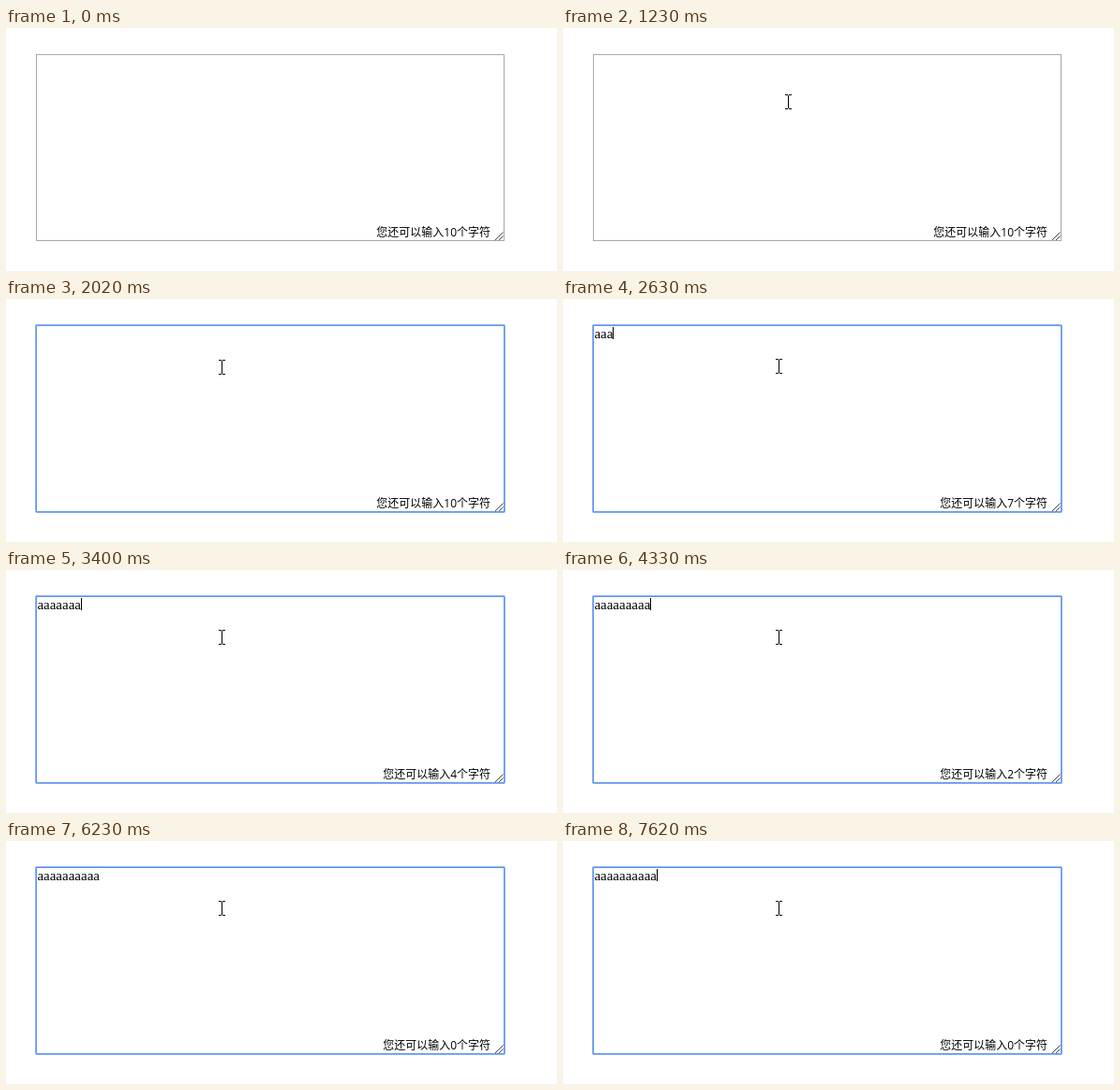
An HTML page for the animation above (8 s loop, 588 by 260 pixels).

```html
<!DOCTYPE html>
<html lang="zh-CN">
<head>
<meta charset="utf-8">
<style>
  html, body { margin: 0; width: 588px; height: 260px; overflow: hidden; background: #fff; }
  svg { display: block; }
  path, rect { fill: none; }
  #typed { font: 15px "Liberation Serif", serif; }
  #hint { font: 12px "Open Sans", "Noto Sans CJK SC", "Noto Sans CJK", sans-serif; text-anchor: end; }
</style>
</head>
<body>
<svg width="588" height="260" viewBox="0 0 588 260">
  <rect x="32.5" y="28.5" width="499" height="199" stroke="#a9a9a9"/>
  <path d="M522 227l8.5-8.5M526 227l4.5-4.5" stroke="#444"/>
  <rect id="ring" x="32" y="28" width="500" height="200" rx="1" stroke="#4d90fe" stroke-opacity=".7" stroke-width="2"/>
  <text id="typed" x="33.4" y="42"></text>
  <path id="caret" d="M.5 30v13" stroke="#000"/>
  <text id="hint" x="517" y="223"></text>
  <path id="beam" d="M-3-7.5h3m1 0h3M.5-7v14M-3 7.5h3m1 0h3" stroke="#000"/>
  <path id="arrow" d="M.5.5v15.5l3.6-3.4 2.6 6 2.4-1-2.6-5.8h5z" stroke="#000" style="fill:#fff"/>
</svg>
<script>
const LOOP = 8000, START = 430, STEP = 156; // ms
const LIMIT = 10, FOCUS = 6, BLINK = 3;     // the last two in steps
const [ring, typed, caret, hint, beam, arrow] =
  ['ring', 'typed', 'caret', 'hint', 'beam', 'arrow'].map(id => document.getElementById(id));

// Quick typing that slows to one letter every three steps
const keys = Array.from({ length: LIMIT }, (_, i) => Math.floor(Math.max(11 + 1.4 * i, 3 * i + 1)));
// Letters over the limit, each trimmed one step later
const surplus = [33, 40, 45];
const edits = [FOCUS, ...keys, ...surplus.map(s => s + 1)];

// Pointer path: [step, x, y]
const path = [[0, 262, 243], [5, 240, 79], [6, 238, 79], [7, 222, 71], [9, 229, 73], [11, 230, 72]];

const lettersAt = step => keys.filter(k => k <= step).length;
const show = (el, on) => el.setAttribute('visibility', on ? 'visible' : 'hidden');
const move = (el, x, y) => el.setAttribute('transform', `translate(${x} ${y})`);

function pointerAt(step) {
  const i = path.findIndex(p => p[0] > step);
  if (i < 0) return path[path.length - 1].slice(1);
  const [s0, ...from] = path[i - 1], [s1, ...to] = path[i];
  return from.map((v, j) => Math.round(v + (to[j] - v) * (step - s0) / (s1 - s0)));
}

function draw(t) {
  const step = Math.floor((t - START) / STEP);
  const over = surplus.includes(step);
  const letters = lettersAt(step) + over;
  typed.textContent = 'a'.repeat(letters);
  hint.textContent = `您还可以输入${LIMIT - lettersAt(step - 1)}个字符`;

  const idle = step - Math.max(...edits.filter(e => e <= step));
  show(ring, step >= FOCUS);
  show(caret, step >= FOCUS && (over || Math.floor(idle / BLINK) % 2 === 0));
  move(caret, Math.floor((100 + 20 * letters) / 3), 0);

  const [x, y] = step < 0 ? [0, 0] : pointerAt(step);
  const outside = y > 228;
  show(beam, step >= 0 && !outside);
  show(arrow, outside);
  move(outside ? arrow : beam, x, y);
}

const start = performance.now();
function tick() {
  draw((performance.now() - start) % LOOP);
  requestAnimationFrame(tick);
}
tick();
</script>
</body>
</html>
```
